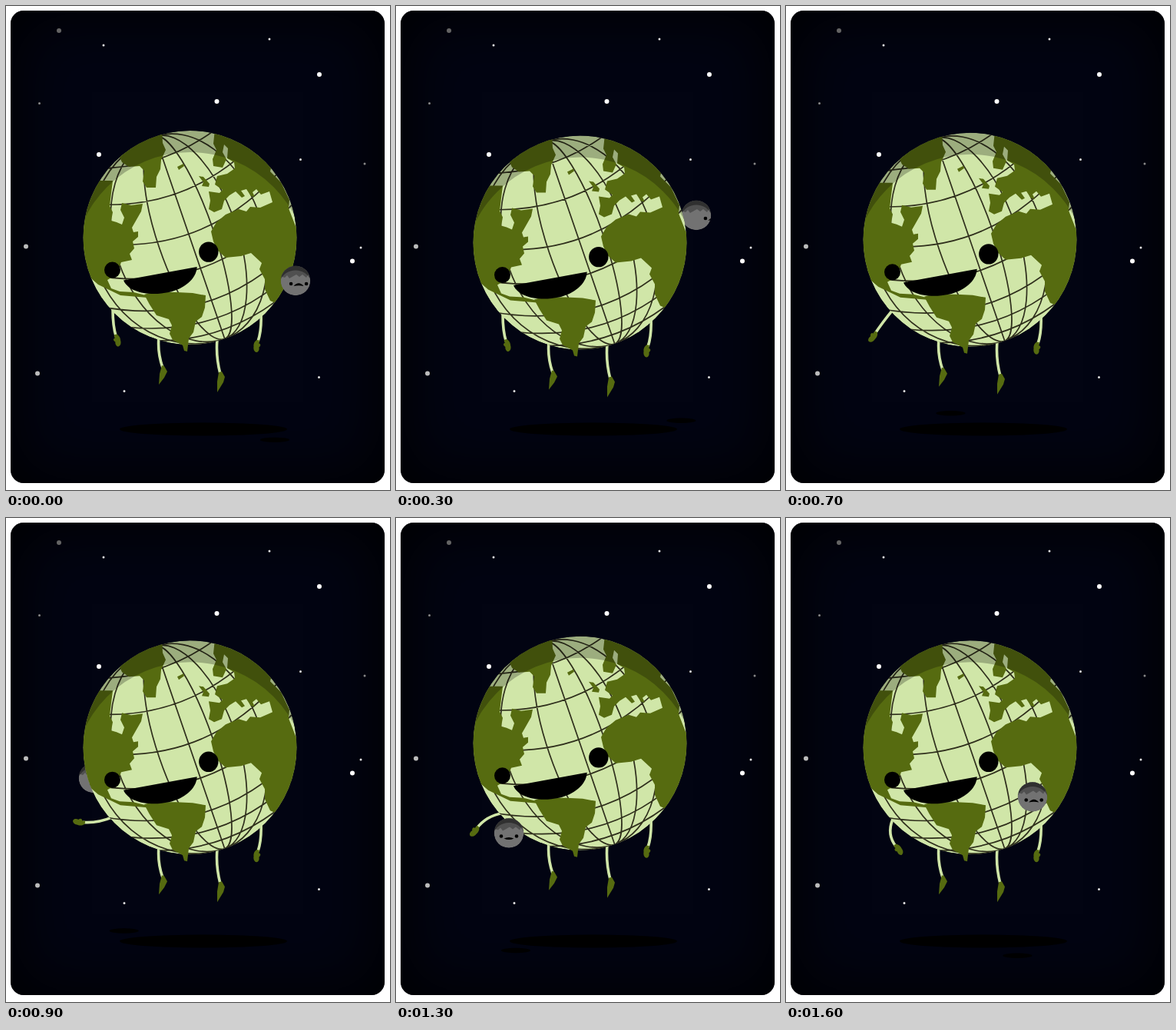
Recreate the animation shown at these times as an HTML page. Size 500 by 629 pixels, loop 1700 ms.

```html
<!DOCTYPE html>
<html lang="en">
<head>
<meta charset="utf-8">
<title>Earth and moon</title>
<style>
html, body { margin: 0; height: 100%; overflow: hidden; background: #fff; }
.sky { position: absolute; left: 6px; top: 6px; width: 487px; height: 614px; border-radius: 17px;
  background: #020412; box-shadow: inset 0 0 85px 4px #000; }
svg { position: absolute; left: 0; top: 0; }
.stars { stroke-linecap: round; }
.land { fill: #566b10; }
.limb { fill: none; stroke: #d0e6a8; stroke-width: 3.6; }
#grid { fill: none; stroke: #2f2f1c; stroke-width: 1.7; }
</style>
</head>
<body>
<div class="sky"></div>
<svg width="500" height="629" viewBox="0 0 500 629">
  <defs>
    <clipPath id="globe"><circle cx="239.5" cy="301" r="139"/></clipPath>
    <clipPath id="disc"><circle r="19.3"/></clipPath>
    <path id="hand" class="land" d="M-3 -1.5C-1 -4 3 -5 6 -4C10 -4 13 -2 13 1C12 4 8 4 6 3C4 5 1 5 1 2L-3 2Z"/>
  </defs>
  <g class="stars">
    <path stroke="#fff" stroke-width="6" d="M408 89h0M274.500 124h0M121 193h0M451 331.500h0"/>
    <path stroke="#bbb" stroke-width="6" d="M26 312.500h0M41 477.500h0"/>
    <path stroke="#646464" stroke-width="6" d="M69 32h0"/>
    <path stroke="#e0e0e0" stroke-width="3" d="M127 51h0M343 43h0M383.500 199.500h0M462 314h0M154 500.500h0M407.500 482.500h0"/>
    <path stroke="#888" stroke-width="3" d="M43.500 126.500h0M467 205h0"/>
  </g>
  <ellipse cx="257" cy="550" rx="109" ry="8.5"/>
  <ellipse id="moonShadow" rx="19" ry="3.2"/>
  <g id="back"></g>
  <g id="earth">
    <path id="arm" class="limb"/>
    <use id="armHand" href="#hand"/>
    <path class="limb" d="M332 400Q333 421 328 436M199 430Q197 450 204 470M275 433Q273 455 279 478"/>
    <use href="#hand" transform="translate(327.5 437) rotate(100) scale(1 -1)"/>
    <path class="land" d="M203 467L206 468L210 475L206 483L199 492L200 478ZM277 476L281 475L285 482L283 489L275 502L275 488Z"/>
    <g clip-path="url(#globe)">
      <circle cx="239.5" cy="301" r="139" fill="#d0e6a8"/>
      <path id="grid" transform="translate(239.5 301) rotate(-19)"/>
      <path class="land" d="M95 227L139 227L137 243L135 260L139 268L137 279L144 281L151 284L154 275L149 265L151 256L163 259L178 257L176 267L164 288L166 294L172 293L172 300L165 306L167 315L161 322L164 330L150 333L144 349L132 356L137 367L148 371L166 372L182 376L184 379L149 376L120 362L95 340Z
        M145 190L165 165L203 160L204 178L208 187L202 200L201 212L196 222L195 236L183 236L178 228L180 214L174 208L160 209L151 203Z
        M223 209L231 205L232 208L225 213Z
        M251 221L257 222L265 231L264 235L255 234L257 229Z
        M272 160L330 175L346 207L344 215L358 229L369 252L368 263L377 286L390 290L390 315L377 319L385 340L360 390L344 383L337 368L337 355L330 342L333 334L319 321L306 325L286 327L276 318L270 306L267 293L274 281L286 271L303 264L313 267L318 261L331 262L347 255L343 241L332 245L326 238L321 242L324 248L319 247L313 238L306 240L311 247L307 249L299 241L291 246L284 253L281 264L271 268L264 264L266 253L264 241L278 243L282 239L272 232L275 221L288 218L298 211L297 203L288 198L289 185L284 180L282 190L287 199L282 210L270 208L269 199L274 187L270 179Z"/>
      <path fill-opacity=".25" fill-rule="evenodd" d="M90 150H390V343H393A153 153 0 0 0 87 343H90Z"/>
    </g>
    <path class="land" d="M180 375L190 372L222 372L243 373L260 376L259 392L255 404L247 410L244 424L238 432L236 449L232 448L230 441L217 434L213 426L216 415L212 407L196 402L187 388Z"/>
    <circle cx="138.5" cy="343" r="10.5"/>
    <ellipse cx="263.8" cy="319.5" rx="12.7" ry="13.2"/>
    <path d="M153 356.500L248.700 339C248 355 231 368 212 372C188 377 160 373 153 356.500Z"/>
  </g>
  <g id="front"></g>
  <g id="moon" clip-path="url(#disc)">
    <circle r="19.3" fill="#727272"/>
    <path fill="#505050" d="M-20 -6L-14 -4L-11 -7L-8 -3L1 -8L5 -5L9 -8L14 -4L17 -9V-20H-20Z"/>
    <path fill-opacity=".4" d="M-20 -20H20V0A21.500 21.500 0 0 0 -20 0Z"/>
    <g id="face"><circle cx="-10" cy="4" r="2.3"/><circle cx="10" cy="4" r="2.3"/><path id="mouth"/></g>
  </g>
</svg>
<script>
const LOOP = 1700, STEP = 100, RADIUS = 139, TURN = 2 * Math.PI;
const el = id => document.getElementById(id);
const set = (id, attrs) => Object.entries(attrs).forEach(([k, v]) => el(id).setAttribute(k, v));
const polar = (length, degrees) => {
  const a = degrees * TURN / 360;
  return [length * Math.cos(a), length * Math.sin(a)];
};

// Globe grid: meridians are half ellipses, parallels are sagging arcs
const meridians = [-128, -98, -42, 0, 32, 62, 95].map(r =>
  `M0 ${-RADIUS}A${Math.abs(r)} ${RADIUS} 0 0 ${r > 0 ? 1 : 0} 0 ${RADIUS}`);
const parallels = [-110, -60, -5, 42, 86, 110, 127].map(y =>
  `M${-RADIUS} ${y - 39}Q0 ${y + 39} ${RADIUS} ${y - 39}`);
set('grid', { d: meridians.concat(parallels).join('') });

// Key points of the moon's path: time, x, y
const path = [
  [0, 377, 357], [150, 405, 316], [300, 391, 272], [600, 270, 238],
  [900, 114, 338], [1100, 90.5, 364.5], [1300, 147, 409.5], [1600, 321, 362.5]
];

// Smooth closed curve through the key points
function moonAt(t) {
  const n = path.length;
  const key = i => {
    const [time, ...p] = path[(i + n) % n];
    return { time: time + LOOP * Math.floor(i / n), p };
  };
  const i = path.filter(k => k[0] <= t).length - 1;
  const [a, b, c, d] = [-1, 0, 1, 2].map(k => key(i + k));
  const h = c.time - b.time, u = (t - b.time) / h;
  return b.p.map((p, j) => {
    const q = c.p[j];
    const m0 = (q - a.p[j]) / (c.time - a.time) * h;
    const m1 = (d.p[j] - p) / (d.time - b.time) * h;
    return p + u * (m0 + u * (3 * (q - p) - 2 * m0 - m1 + u * (2 * (p - q) + m0 + m1)));
  });
}

// The arm rises slowly to the catch at 1100 ms and drops faster
function lift(t) {
  const phase = (t - 1100) / (t < 1100 ? 720 : 480);
  return Math.abs(phase) < 1 ? Math.cos(phase * TURN / 4) : 0;
}

function drawArm(t) {
  const up = lift(t);
  const [ex, ey] = polar(22, 90 + 85 * lift(t - 100));
  const [wx, wy] = polar(36 + 4 * up, 83 + 106 * up * up);
  const angle = Math.atan2(wy - ey, wx - ex) * 360 / TURN;
  const shoulder = `139 ${394 - 3 * up}`;
  set('arm', { d: `M${shoulder}q${ex} ${ey} ${wx} ${wy}` });
  set('armHand', { transform: `translate(${shoulder}) translate(${wx} ${wy}) rotate(${angle})` });
}

function drawMoon(t) {
  const [x, y] = moonAt(t);
  const sinceBack = (t + 700) % LOOP;
  const layer = el(sinceBack < 950 ? 'front' : 'back');
  if (el('moon').parentNode !== layer) layer.append(el('moon'));
  set('moon', { transform: `translate(${x} ${y})` });

  const smile = Math.max(-1, 1 - Math.abs(t - 1100) / 200);
  const look = ((sinceBack - 300) / 250) ** 3;
  set('face', { transform: `translate(${look} 0)`, visibility: sinceBack < 1100 ? 'visible' : 'hidden' });
  set('mouth', { d: `M-6.5 7Q0 ${10 + 4.5 * smile} 6.5 7Q0 ${4 + 4.5 * smile} -6.5 7Z` });

  const w = TURN * t / LOOP, orbit = TURN / 8 - w - .21 * Math.sin(w);
  set('moonShadow', { cx: 258 + 130 * Math.cos(orbit), cy: 549 + 21 * Math.sin(orbit) });
}

function draw(t) {
  const bob = 7.7 * Math.cos((t - 400) / LOOP * TURN) - .6;
  set('earth', { transform: `translate(0 ${bob})` });
  drawArm(t);
  drawMoon(t);
}

const start = performance.now();
function tick() {
  const t = (performance.now() - start) % LOOP;
  draw(Math.floor(t / STEP) * STEP);
  requestAnimationFrame(tick);
}
tick();
</script>
</body>
</html>
```
